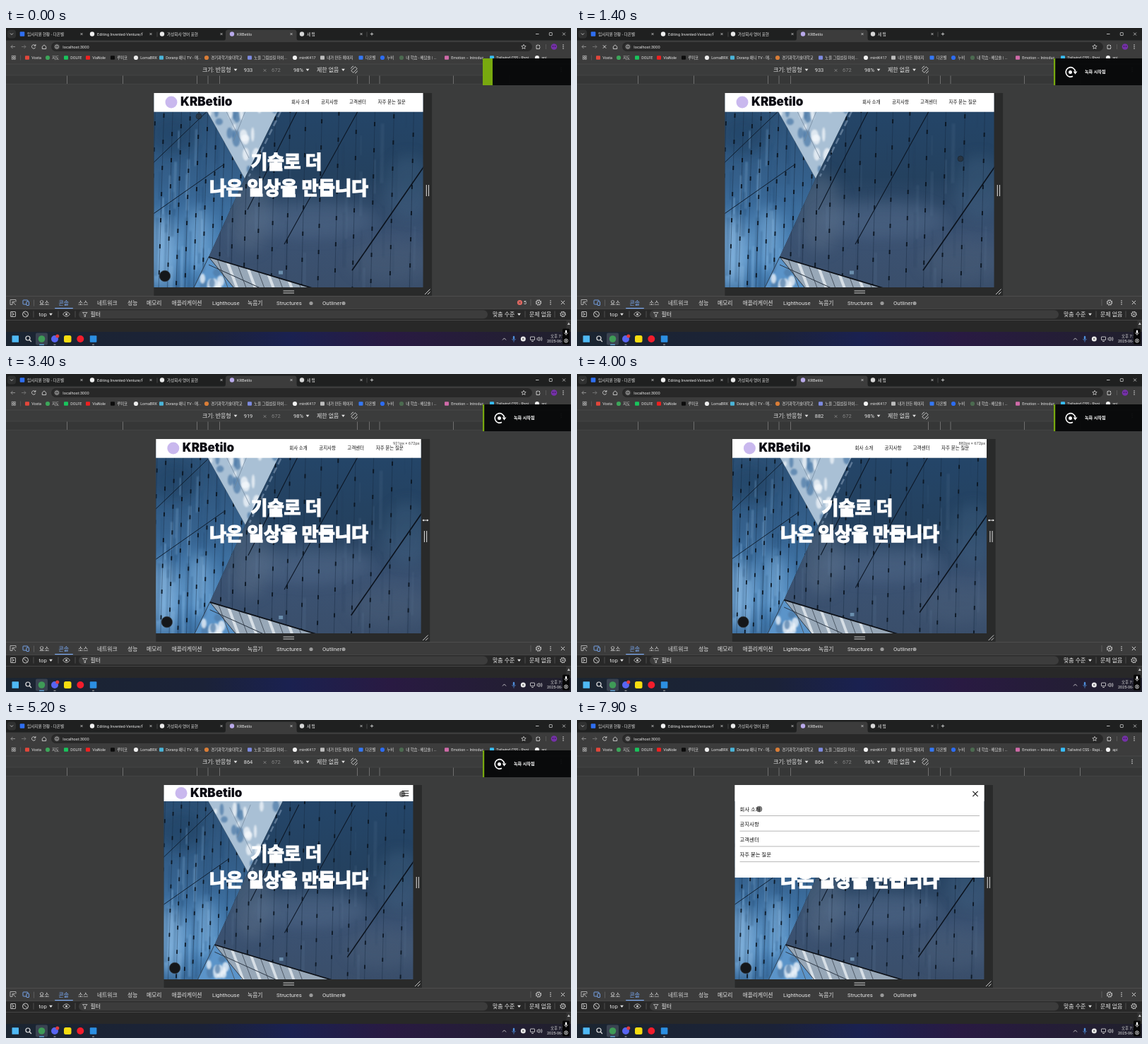
An HTML page for the animation above (8 s loop, 800x450 px).

```html
<!DOCTYPE html>
<html>
<head>
<meta charset="utf-8">
<title>Responsive page preview</title>
<style>
  html, body { margin: 0; width: 100%; height: 100%; overflow: hidden; background: #3c3c3c; }
  svg { display: block; }
  text { font-family: Roboto, 'Noto Sans CJK KR', 'Noto Sans CJK', sans-serif; white-space: pre; }
</style>
</head>
<body>
<svg id="stage" width="800" height="450" viewBox="0 0 800 450"></svg>
<script>
const LOOP = 8000, STEP = 100, TOP = 92, BOTTOM = 367;
const INK = '#e3e3e3', DIM = '#c7c7c7';

// Drawing helpers; text is placed by its vertical middle.
const text = (x, y, size, str, fill = INK, more = '') =>
  `<text x="${x}" y="${y + size * .36}" font-size="${size}" fill="${fill}" ${more}>${str}</text>`;
const rect = (x, y, w, h, fill, r = 0, more = '') =>
  `<rect x="${x}" y="${y}" width="${w}" height="${h}" rx="${r}" fill="${fill}" ${more}/>`;
const dot = (x, y, r, fill, more = '') => `<circle cx="${x}" cy="${y}" r="${r}" fill="${fill}" ${more}/>`;
const line = (d, color = DIM, w = .8, more = '') =>
  `<path d="${d}" fill="none" stroke="${color}" stroke-width="${w}" ${more}/>`;
const poly = (points, fill = '#000') => `<polygon points="${points}" fill="${fill}"/>`;
const cross = (x, y, r, color = DIM, w = .8) =>
  line(`M${x - r} ${y - r}l${2 * r} ${2 * r}M${x + r} ${y - r}l${-2 * r} ${2 * r}`, color, w);
const caret = (x, y) => poly(`${x - 2.4},${y - 1.3} ${x + 2.4},${y - 1.3} ${x},${y + 1.9}`, INK);
const kebab = (x, y) => [-2.5, 0, 2.5].map(d => dot(x, y + d, .75, INK)).join('');
const gear = (x, y) => dot(x, y, 3.6, 'none', `stroke="${DIM}" stroke-width="1.2" stroke-dasharray="1.7 1.1"`) +
  dot(x, y, 3, 'none', `stroke="${DIM}" stroke-width=".8"`) + dot(x, y, 1.1, DIM);
const range = (n, f) => Array.from({ length: n }, (_, i) => f(i)).join('');
const vgrad = (id, stops) => `<linearGradient id="${id}" x2="0" y2="1">` +
  stops.map(([o, c]) => `<stop offset="${o}" stop-color="${c}"/>`).join('') + '</linearGradient>';

let seed = 7;
const random = () => (seed = seed * 16807 % 2147483647) / 2147483647;

function tabStrip() {
  const tabs = [
    [23, 's', '#2f6ff0', '입사지원 현황 - 다온별', 107],
    [122, 'c', '#f0f0f0', 'Editing Invented-Venture/f', 205],
    [221, 'c', '#e8e8e8', '가상회사 영어 표현', 305],
    [320, 'c', '#b9a9ea', 'KRBetilo', 404],
    [419, 'c', '#d6d6d6', '새 탭', 503]
  ];
  return rect(0, 0, 800, 18, '#1f2020') + rect(2, 2.5, 12, 12, '#303131', 4) +
    line('M6 7.5l2 2l2 -2', INK) +
    '<path d="M308 18q3 0 3-4V6q0-3.5 3.5-3.5H408q3.5 0 3.5 3.5V14q0 4 3 4Z" fill="#3c3c3c"/>' +
    tabs.map(([x, kind, color, label, close]) =>
      (kind === 's' ? rect(x - 3.3, 5.2, 6.6, 6.6, color, 1) : dot(x, 8.5, 3.2, color)) +
      `<svg x="${x + 6}" y="0" width="${close - x - 11}" height="17">${text(1, 8.5, 5.6, label)}</svg>` +
      cross(close, 8.5, 1.5, INK, .7)).join('') +
    line('M214 5.5v7M511 5.5v7', '#555') +
    line('M515.8 8.5h4.4M518 6.3v4.4', INK) +
    line('M750 8.5h4.5', INK) + rect(769.3, 6.5, 4, 4, 'none', .5, `stroke="${INK}" stroke-width=".7"`) +
    cross(790, 8.5, 2, INK, .7);
}

function toolbar() {
  return rect(0, 17.5, 800, 33.5, '#3c3c3c') + rect(64, 20, 681, 13, '#282828', 6.5) +
    line('M13 26.5h-6m2.5 -2.5l-2.5 2.5l2.5 2.5', '#a0a0a0') +
    line('M22 26.5h6m-2.5 -2.5l2.5 2.5l-2.5 2.5', '#7b7b7b') +
    `<g id="reload">${line('M41.5 25a2.7 2.7 0 1 0 .2 2.4M41.9 23v2.3h-2.3', INK)}</g>` +
    `<g id="stop">${cross(39, 26.5, 2.2, INK, .9)}</g>` +
    line('M51.3 26.3l2.7-2.4l2.7 2.4v3.2h-5.4z', INK) +
    dot(72, 26.5, 4.5, '#3c3c3c') + dot(72, 26.5, 2.5, 'none', `stroke="${INK}" stroke-width=".7"`) +
    line('M72 26v1.8M72 24.8v.6', INK, .7) +
    text(80.3, 26.5, 5.7, 'localhost:3000') +
    line('M733 23.3l.9 2.1 2.3.2-1.7 1.5.5 2.3-2-1.2-2 1.2.5-2.3-1.7-1.5 2.3-.2z', INK, .7) +
    line('M751 24.5h1.5q.5-1.8 1.5 0h1.5v1.7q1.7.7 0 1.6v1.7h-4.5z', INK) +
    line('M764.5 23v7', '#5d5d5d') + dot(776, 26.5, 4.3, '#7531a8') +
    dot(774.5, 26, .7, '#1a1022') + dot(777.5, 26, .7, '#1a1022') + kebab(789, 26.5);
}

function bookmarks() {
  const items = [
    [30, 's', '#e2473b', 'Vosta'], [59, 'c', '#3da65a', '지도'], [85, 's', '#19c45c', 'DOLFE'],
    [116, 's', '#f02020', 'ViaNole'], [151, 's', '#0c0c0c', '루미코'], [184, 'c', '#ececec', 'LomaBRX'],
    [220, 's', '#4ab4d8', 'Doranp 애니 TV - 매...'], [284, 'c', '#d97d37', '경기과학기술대학교'],
    [345, 's', '#7d8ae0', '노을 그림섬길 마이...'], [409, 'c', '#f2f2f2', 'mintK417'],
    [448, 's', '#bdbdbd', '내가 만든 페이지'], [502.5, 's', '#3478f5', '다온별'], [533, 'c', '#2d6cf0', '누비'],
    [560, 'c', '#4c6b50', '내 학습 - 배담솔 | ...'], [624, 's', '#cf6aa8', 'Emotion – Introduc...'],
    [688, 's', '#38bdf8', 'Tailwind CSS - Rapi...'], [752, 'c', '#f2f2f2', 'api']
  ];
  return range(4, i => rect(8.2 + (i % 2) * 3.2, 39.2 + (i >> 1) * 3.2, 2.1, 2.1, 'none', 0, `stroke="${DIM}" stroke-width=".6"`)) +
    line('M20.5 38.5v7', '#5d5d5d') +
    items.map(([x, kind, color, label]) =>
      (kind === 's' ? rect(x - 3, 39.2, 6, 5.6, color, 1) : dot(x, 42, 3.1, color)) +
      text(x + 6.2, 42, 5.4, label)).join('');
}

function deviceBar() {
  return rect(0, 51, 800, 329, '#3b3c3c') + line('M0 51h800', '#555', .5) +
    text(278, 59, 8, '크기: 반응형') + caret(325, 59) +
    `<text id="width" x="343" y="61.7" font-size="7.5" text-anchor="middle" fill="${INK}"></text>` +
    cross(366.5, 60, 1.8, '#aaa', .6) + text(376, 59, 7.5, '672', '#858585') +
    text(407, 59, 7.6, '98%') + caret(427, 59) + text(440, 59, 8, '제한 없음') + caret(477.5, 59) +
    '<g transform="rotate(45 493 59)">' + rect(491, 55, 4, 8, 'none', .7, `stroke="${INK}" stroke-width=".8"`) + '</g>' +
    line('M488.5 57.5a5 5 0 0 1 3.5 -3.5M497.5 60.5a5 5 0 0 1 -3.5 3.5', INK) + kebab(786, 59) +
    rect(0, 67, 800, 12, '#363737') + line('M0 67h800M0 79.3h800', '#4a4b4b', .6) +
    [86.5, 165.5, 270.5, 286, 302.5, 497.5, 514.5, 529, 633.5, 712.5].map(x => line(`M${x} 67.5v11.5`, '#777', .9)).join('');
}

// Facade of flat panels with generated seams and soft reflections.
function building() {
  const seams = (n, place, lean) => range(n, i => {
    const d = `M${place(i)} 95l${lean} 330`;
    return line(d, '#14263a', .7, 'opacity=".6"') +
      line(d, '#0b1420', 2, `stroke-dasharray="6 31" stroke-dashoffset="${(i * 11) % 37}" opacity=".9"`);
  });
  const streaks = (n, x, y, w, h, lean, dark, light, o) => range(n, () => {
    const px = x + random() * w, py = y + random() * h, len = 20 + random() * 70;
    return line(`M${px} ${py}l${lean * len} ${len}`, random() < .5 ? dark : light, 2 + random() * 4,
      `opacity="${o}" filter="url(#fine)"`);
  });
  const blob = (x, y, rx, ry, c, o, blur = 'soft') =>
    `<ellipse cx="${x}" cy="${y}" rx="${rx}" ry="${ry}" fill="${c}" opacity="${o}" filter="url(#${blur})"/>`;
  const clouds = (n, x, y, w, h) => range(n, i =>
    blob(x + random() * w, y + random() * h, 2 + random() * 4, 4 + random() * 8, i % 3 ? '#f2f6fa' : '#4f7ba8', .75, 'fine'));

  return '<g clip-path="url(#leftWall)">' + rect(190, 95, 210, 310, 'url(#leftFill)') +
      blob(220, 315, 22, 50, '#9cc6ea', .6) + blob(272, 300, 18, 45, '#7fb0dc', .6) + blob(235, 150, 35, 30, '#1f3d5d', .55) +
      streaks(36, 200, 110, 110, 230, -.03, '#274f78', '#8ab8e0', .3) +
      seams(14, i => 212 + i * 12.4, -10) +
      line('M200 199L292 111M200 269L307 194', '#0e1b2b', 1) + '</g>' +
    '<g clip-path="url(#sky)">' + rect(260, 90, 140, 130, '#a9c0d5') + clouds(30, 280, 110, 105, 95) +
      line('M310 114l34 70M342 110l-20 50', '#6d8298', .7) + '</g>' +
    '<g clip-path="url(#rightWall)">' + rect(270, 95, 340, 330, 'url(#rightFill)') +
      blob(345, 260, 30, 55, '#5b7087', .5) + blob(430, 270, 90, 25, '#62799a', .35) +
      blob(570, 225, 35, 45, '#4d7092', .3) + blob(545, 330, 60, 30, '#53667f', .3) +
      streaks(30, 300, 110, 290, 240, -.02, '#213a57', '#6d8bab', .12) +
      seams(13, i => 308 + i * 16.5 + i * i / 2, -8) +
      line('M342 257L416 110M394 306L502 111', '#0b1523', 1.1) + line('M490 343L598 187', '#0a111b', 1.6) +
      line('M389 118L344 210', '#8aa3bd', 2.5, 'stroke-dasharray="9 5" opacity=".55"') + '</g>' +
    '<g clip-path="url(#canopy)">' + rect(240, 320, 370, 130, '#98a8b8') +
      poly('287,324 322,367 345,395 250,395', '#5b94c9') + clouds(10, 270, 335, 40, 35) +
      range(9, i => line(`M${298 + i * 14} ${324 + i * 3}l26 70`, i % 2 ? '#d7dfe6' : '#4a5562', i % 2 ? 4 : 1)) +
      line('M287 324L345 395M287 335L420 395', '#27313e', 1) + '</g>' +
    line('M287 324L600 418', '#0c1017', 1.8) + line('M287 324L256 388', '#1d2937', .8) + rect(386, 343.5, 6, 5, '#6b8fae');
}

const MENU = ['회사 소개', '공지사항', '고객센터', '자주 묻는 질문'];

function site() {
  const hero = (x, y, str) => text(x, y, 25.6, str, '#fff',
    'font-weight="900" text-anchor="middle" stroke="#fff" stroke-width="1.6"');
  const navX = [-186.5, -144.5, -104.5, -64];
  return `<rect id="panel" y="${TOP}" height="287" fill="#292a2a"/>
    ${line('M392.5 372h15.5M392.5 375h15.5', '#d0d0d0', 1.1)}
    <g id="handle">${line('M4.8 222v16M8 222v16', '#d0d0d0', 1.1)}${line('M2.5 377l7.5-7.5M6.5 377l3.5-3.5', '#d0d0d0', 1)}</g>
    <g clip-path="url(#view)">
      <g id="photo">${building()}</g>
      <g id="hero">${hero(397, 190, '기술로 더')}${hero(400.5, 226.5, '나은 일상을 만듭니다')}</g>
      <rect id="header" x="200" y="${TOP}" width="400" fill="#fff"/>
      <g id="brand">${dot(24.5, 0, 8.5, '#c9b8ee')}${text(37.5, -.8, 17, 'KRBetilo', '#0c0c14', 'font-weight="900" style="font-family:Inter,sans-serif"')}</g>
      <g id="nav">${MENU.map((s, i) => text(navX[i], 104.5, 6.5, s, '#111', 'font-weight="500"')).join('')}</g>
      <g id="burger">${line('M-16 100.5h9.8M-16 103.8h9.8M-16 107.1h9.8', '#111', 1.1)}</g>
      <g id="badge">${dot(15.5, 351, 7.8, '#15171a', 'stroke="#3a3f46" stroke-width=".6"')}</g>
      <g id="menu">${rect(223, TOP, 355, 131, '#fff')}${cross(564, 104.5, 3.6, '#111', 1.1)}
        ${MENU.map((s, i) => text(230.5, 126 + i * 21.6, 7.4, s, '#111') +
          line(`M230.5 ${135.5 + i * 21.7}h339.5`, '#b0b0b0', .9)).join('')}</g>
      <text id="size" y="99.7" font-size="5.8" text-anchor="end" fill="#444"></text>
    </g>`;
}

function devtools() {
  const tabs = [[47, '요소'], [74.5, '콘솔'], [102, '소스'], [129, '네트워크'], [172, '성능'], [199, '메모리'],
    [234.5, '애플리케이션'], [292, 'Lighthouse'], [342, '녹음기'], [383, 'Structures'], [448, 'Outliner']];
  return rect(0, 379.5, 800, 18, '#3c3c3c') + line('M0 379.5h800', '#5a5a5a', .6) +
    line('M9 391.5h-3v-7h8v3M9 387.5l5 4.5M9 387.5v4M9 387.5h4', DIM) +
    rect(24, 385, 7, 6, 'none', .8, 'stroke="#7cacf8" stroke-width=".9"') + rect(29, 387, 3.5, 5.5, '#3c3c3c', .5, 'stroke="#7cacf8" stroke-width=".9"') +
    line('M39.5 384.5v9', '#666') +
    tabs.map(([x, s]) => text(x, 389, 7.8, s, s === '콘솔' ? '#7cacf8' : INK)).join('') +
    rect(69, 396, 26, 1.6, '#7cacf8', .8) + dot(432, 389.5, 2.6, '#9a9a9a') + dot(478, 389.5, 2.6, '#9a9a9a') +
    `<g id="errors">${dot(727.5, 388.5, 3.6, '#e46962')}${cross(727.5, 388.5, 1.3, '#3c3c3c', .8)}${text(732.7, 388.5, 7.5, '5')}</g>` +
    line('M743 384v9', '#666') + gear(754, 388.5) + kebab(771, 388.5) + cross(788.5, 388.5, 2.6, INK, .9) +
    rect(0, 397.6, 800, 16, '#282828') + line('M0 397.6h800M0 413.5h800', '#555', .6) +
    rect(6.5, 401.5, 7, 7, 'none', .5, `stroke="${DIM}" stroke-width=".9"`) + line('M8.7 401.5v7', DIM) + poly('10,403.5 10,406.5 12,405', DIM) +
    dot(27.5, 405, 4, 'none', `stroke="${DIM}" stroke-width="1"`) + line('M24.8 402.3l5.4 5.4', DIM, 1) +
    line('M39 400.5v9M74 400.5v9M98 400.5v9M735 400.5v9M777 400.5v9', '#5a5a5a') +
    text(46.5, 405, 7.8, 'top') + caret(63.5, 405) +
    line('M80.5 405q5 -6.5 10 0q-5 6.5 -10 0z', DIM, .9) + dot(85.5, 405, 1.6, DIM) +
    rect(103, 399.3, 579, 12, '#3c3c3c', 6) + line('M108.5 402.5h6.5l-2.5 3v3h-1.5v-3z', DIM) + text(119.5, 405, 8, '필터') +
    text(689, 405, 8, '맞춤 수준') + caret(726.5, 405) + text(741, 405, 8, '문제 없음') + gear(788.5, 405) +
    rect(0, 414, 800, 16, '#282828') + rect(793.5, 414, 6.5, 16, '#343434') + poly('794.8,420 798.8,420 796.8,416.5', '#bbb');
}

function taskbar() {
  return rect(0, 430, 800, 20, 'url(#bar)') +
    rect(8.5, 435.3, 9.5, 9.5, '#4fb9f5', .6) +
    dot(31, 439, 3, 'none', `stroke="${INK}" stroke-width="1.2"`) + line('M33.3 441.3l2.6 2.7', INK, 1.3) +
    rect(42, 431.5, 17, 17, '#3a4351', 2) + dot(50.5, 440, 4.8, '#3f9b57') + rect(47, 447.6, 7, 1.2, '#68b5ee', .6) +
    dot(69, 440, 5, '#5865f2') + dot(72.8, 436, 2.5, '#e23b3b') + rect(67.5, 447.6, 3, 1.1, '#999', .5) +
    rect(82, 435, 10.5, 10, '#f6dd10', 2.5) + dot(105.3, 440, 5, '#f21d2c') +
    rect(118.8, 435.2, 9.6, 9.6, '#2c8fe2', 1) + rect(122, 447.6, 3, 1.1, '#999', .5) +
    line('M703 441.5l2.5-2.6l2.5 2.6', INK) + rect(717.8, 435.8, 2.4, 5, '#4f8fdc', 1.2) + line('M716.5 440a2.6 2.6 0 0 0 5 0M719 442.5v2', '#4f8fdc') +
    dot(732.3, 440, 3.5, '#f0f0f0') + cross(732.3, 440, 1.2, '#333', .8) +
    rect(742.5, 437, 6, 4.5, 'none', .4, `stroke="${INK}" stroke-width=".8"`) + line('M744 443.5h3', INK) +
    line('M752 438.8h1.3l1.7-1.5v5.5l-1.7-1.5h-1.3zM756.5 438q1.5 2 0 4M758 437q2.2 3 0 6', INK, .7) +
    text(771, 436, 5.5, '오후 7:17') + text(766, 443.5, 5.5, '2025-06-24') +
    rect(788, 425.5, 10, 22, '#070707', 1.5) + rect(791.9, 427.5, 2.2, 4.5, '#fff', 1.1) + line('M790.7 431a2.3 2.3 0 0 0 4.6 0M793 433.3v1.5', '#fff', .7) +
    dot(793, 442.5, 2.5, 'none', 'stroke="#fff" stroke-width=".8"') + dot(793, 442.5, 1, '#fff');
}

function toast() {
  return `<g id="toast">${rect(675, 43, 126, 38, '#08090a', 0, 'opacity=".96"')}
    <rect id="stripe" x="675" y="43" height="38" fill="#78a90f"/>
    <g id="notice">${line('M702 68.3a6.7 6.7 0 1 1 3.5 -6.8', '#fff', 1.6)}${poly('702.6,61.5 708.4,61.5 705.5,65.5', '#fff')}
    ${dot(698.5, 62.5, 2.5, '#fff')}${text(719, 62, 6.1, '녹화 시작됨', '#fff', 'font-weight="700"')}</g></g>`;
}

const clip = (id, body) => `<clipPath id="${id}">${body}</clipPath>`;
const blur = (id, size) => `<filter id="${id}" x="-100%" y="-100%" width="300%" height="300%" filterUnits="objectBoundingBox"><feGaussianBlur stdDeviation="${size}"/></filter>`;
document.getElementById('stage').innerHTML = `<defs>
  ${vgrad('leftFill', [[0, '#2b4e72'], [.4, '#35618d'], [.75, '#4a86bd'], [1, '#335f8b']])}
  ${vgrad('rightFill', [[0, '#24466a'], [.35, '#24415f'], [.6, '#3b5272'], [1, '#394c66']])}
  <linearGradient id="bar"><stop offset="0" stop-color="#1b2531"/><stop offset=".35" stop-color="#1b2238"/>
    <stop offset=".5" stop-color="#1a2150"/><stop offset=".68" stop-color="#291a42"/><stop offset="1" stop-color="#20202c"/></linearGradient>
  ${blur('soft', 10)}${blur('fine', 1.2)}
  ${clip('leftWall', poly('190,95 272,95 338,213 287,324 250,400 190,400'))}
  ${clip('sky', poly('272,95 396,95 338,213'))}
  ${clip('rightWall', poly('396,95 610,95 610,421 287,324 338,213'))}
  ${clip('canopy', poly('287,324 610,421 610,440 250,400'))}
  ${clip('view', `<rect id="frame" y="${TOP}" height="${BOTTOM - TOP}"/>`)}
  </defs>` + tabStrip() + toolbar() + bookmarks() + deviceBar() + site() + devtools() + taskbar() + toast() +
  `<g id="touch">${dot(0, 0, 4, '#2a2a2a', 'opacity=".6" stroke="#111" stroke-width=".7"')}</g>
   <g id="resize">${line('M-3 0h6', '#fff', .9)}${poly('-4.5,0 -2.3,-1.6 -2.3,1.6', '#fff')}${poly('4.5,0 2.3,-1.6 2.3,1.6', '#fff')}</g>`;

const el = {};
document.querySelectorAll('svg [id]').forEach(n => el[n.id] = n);
const set = (id, attrs) => { for (const k in attrs) el[id].setAttribute(k, attrs[k]); };
const move = (id, x, y = 0) => set(id, { transform: `translate(${x} ${y})` });
const show = (id, on) => set(id, { opacity: +on });
const ramp = (t, a, b) => Math.min(1, Math.max(0, (t - a) / (b - a)));

// Rows are [time, ...values], linear in between.
function track(rows, t) {
  const i = rows.findIndex(r => r[0] > t);
  if (i < 0) return rows[rows.length - 1].slice(1);
  if (i === 0) return rows[0].slice(1);
  const [a, b] = [rows[i - 1], rows[i]], p = ramp(t, a[0], b[0]);
  return a.slice(1).map((v, k) => v + (b[k + 1] - v) * p);
}
const WIDTHS = [[3100, 933], [3400, 919], [4000, 882], [4300, 864]];
const POINTER = [[0, 273, 125], [500, 350, 145], [1400, 543, 185], [2200, 580, 204], [2500, 597, 207], [4500, 583, 207],
  [4900, 561, 105], [5800, 561, 105], [6000, 563.5, 104], [6900, 563.5, 104], [7200, 566, 114], [7800, 262, 126], [7900, 258, 126]];

function draw(t) {
  const w = Math.round(track(WIDTHS, t)[0]);
  const half = w * .2042, left = 400 - half, right = 400 + half, k = w / 933;
  const narrow = w <= 870, loading = t >= 1000 && t < 1900;
  const dragging = t >= 3100 && t < 4500;

  el.width.textContent = w;
  set('frame', { x: left, width: 2 * half });
  set('panel', { x: left, width: 2 * half + 12.5 });
  move('handle', right);
  set('photo', { transform: `translate(400 243) scale(${k}) translate(-400 -243)` });
  set('header', { height: narrow ? 23 : 26.7 });
  move('brand', left, narrow ? 103.5 : 105);
  move('nav', right);
  move('burger', right);
  move('badge', left);
  show('nav', !narrow);
  show('burger', narrow);
  show('badge', !loading);
  show('errors', t < 1000);
  show('reload', !loading);
  show('stop', loading);
  show('hero', t < 1000 ? 1 : ramp(t, 1800, 2400));

  const lag = Math.round(track(WIDTHS, t - (t < 3700 ? 43 : 0))[0]);
  el.size.textContent = `${lag}px × 672px`;
  set('size', { x: right - 2 });
  show('size', dragging);

  move('menu', 0, -131 * Math.pow(1 - ramp(t, 6000, 6500), 2.73));
  show('menu', t > 6000);

  set('stripe', { width: 2.2 + 11.8 * (1 - ramp(t, 0, 300)) });
  show('notice', ramp(t, 200, 500));
  move('toast', 130 * Math.pow(ramp(t, 6500, 7000), 2));

  const [x, y] = track(POINTER, t);
  const overEdge = t >= 2500 && t <= 4500;
  move('touch', x, y);
  move('resize', right + 6.3, 207);
  show('touch', !overEdge);
  show('resize', overEdge);
}

const start = performance.now();
function tick(now) {
  const t = Math.max(0, now - start) % LOOP;
  draw(Math.floor(t / STEP) * STEP);
  requestAnimationFrame(tick);
}
draw(0);
requestAnimationFrame(tick);
</script>
</body>
</html>
```
